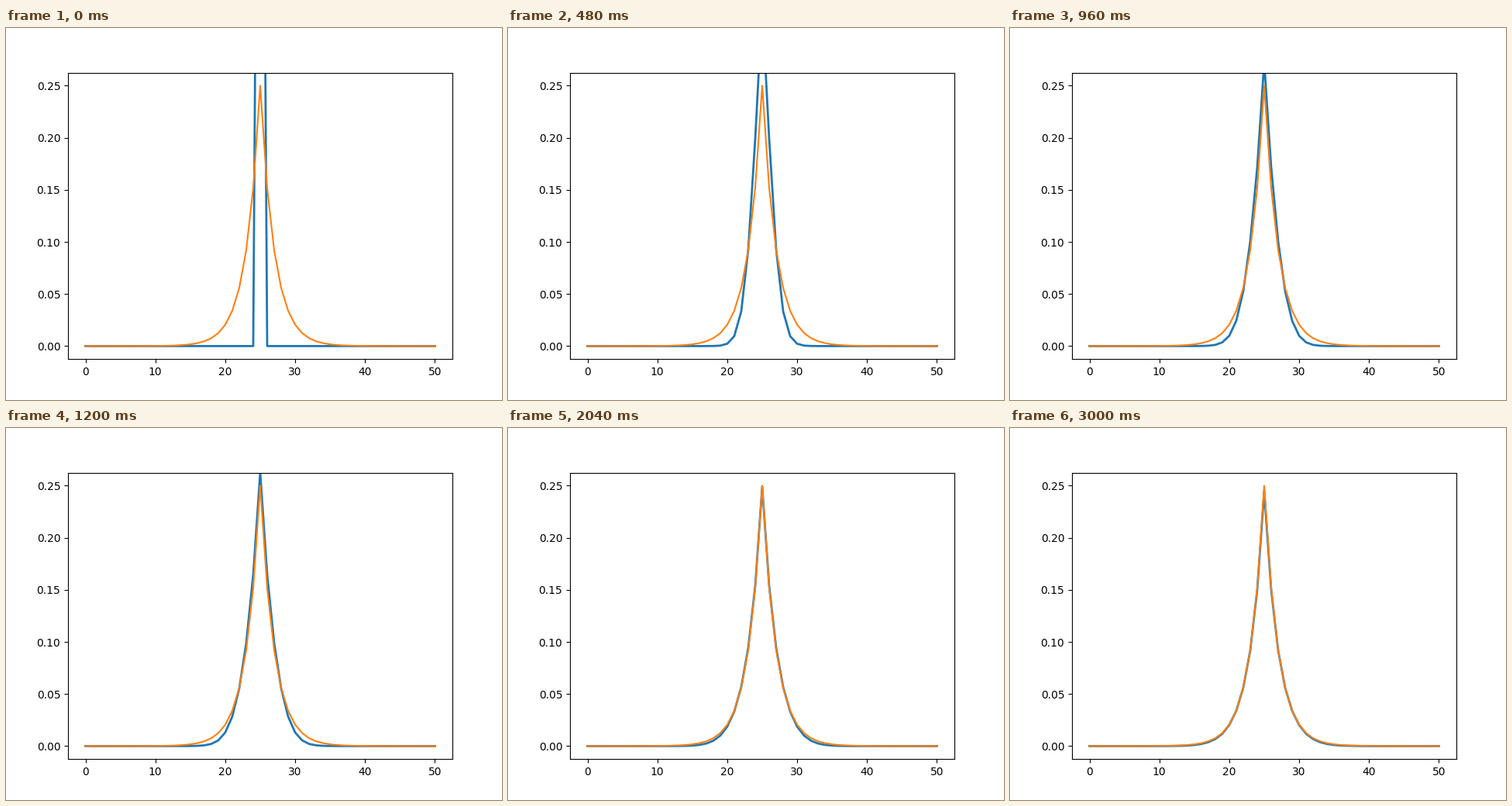
A matplotlib script that plays this animation: 640x480 px, repeating every 3030 ms.

```python
import numpy as np
import matplotlib.pyplot as plt
from matplotlib.animation import FuncAnimation

N = 51            # lattice sites
X0 = 25           # start and reset site
D, R = 1.0, 0.25  # diffusion constant, reset rate
DT = 0.01
SUBSTEPS = 8      # integration steps per frame
FRAMES = 101


def evolve():
    """Diffusion with stochastic resetting, one row per frame."""
    p = np.zeros(N)
    p[X0] = 1.0
    rows = [p.copy()]
    for _ in range(FRAMES - 1):
        for _ in range(SUBSTEPS):
            q = np.pad(p, 1, mode="edge")
            lap = q[:-2] - 2 * p + q[2:]
            p = p + DT * (D * lap - R * p)
            p[X0] += DT * R
        rows.append(p.copy())
    return rows


x = np.arange(N)
history = evolve()
alpha = np.sqrt(R / D)
steady = alpha / 2 * np.exp(-alpha * np.abs(x - X0))

fig, ax = plt.subplots(figsize=(6.4, 4.8), dpi=100)
line, = ax.plot(x, np.zeros(N), lw=2)
ax.plot(x, steady)
ax.set_xlim(-2.5, 52.5)
ax.set_ylim(-0.0125, 0.2625)


def update(i):
    line.set_ydata(history[i])
    return line,


anim = FuncAnimation(fig, update, frames=FRAMES, interval=30,
                     repeat=True, repeat_delay=0)
plt.show()
```
